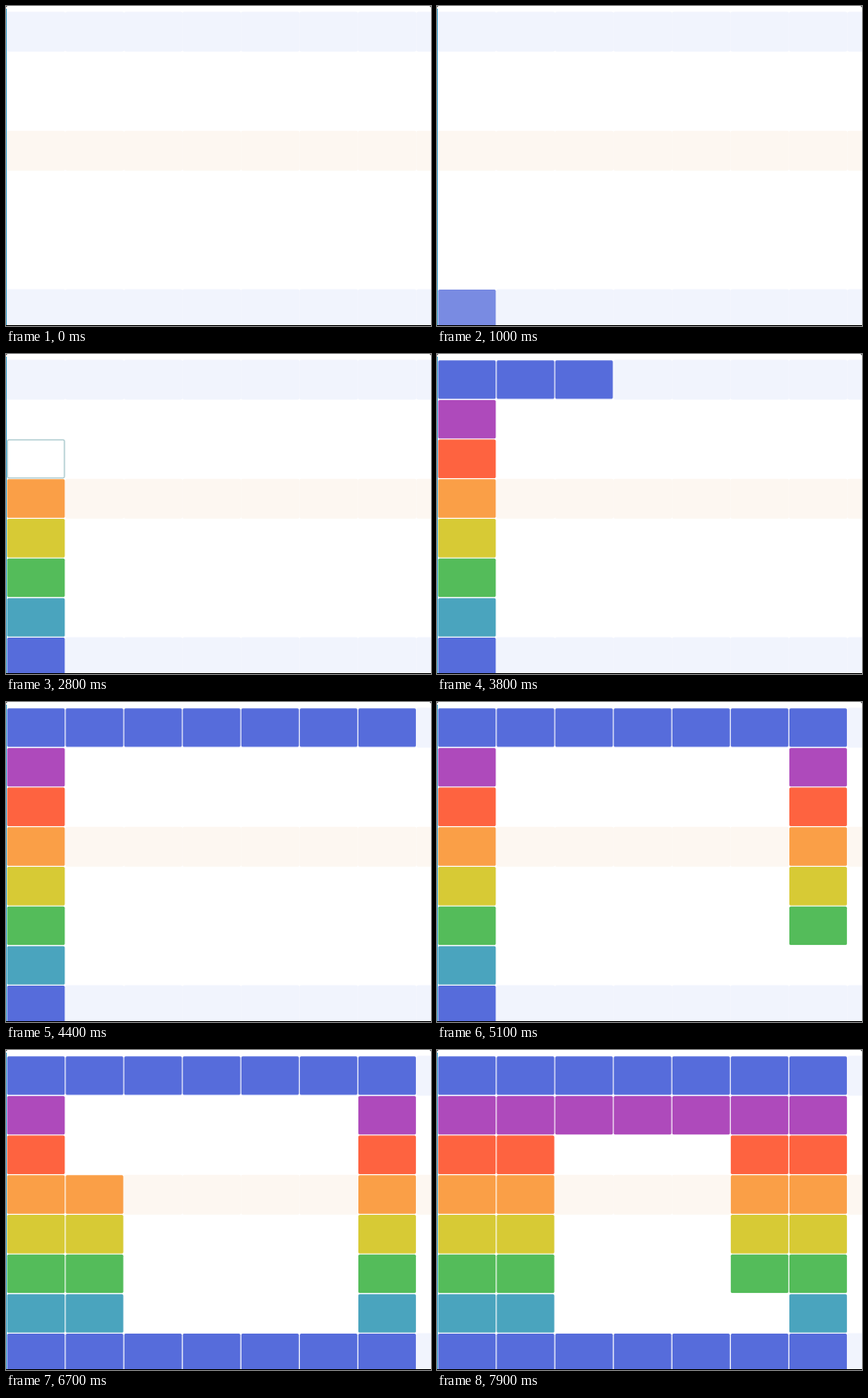
Recreate the animation shown at these times as an HTML page with a canvas. Size 480 px wide and 361 px high, loop 8 s.

```html
<!DOCTYPE html>
<html lang="en">
<head>
<meta charset="utf-8">
<title>Spiral fill</title>
<style>
  html, body { margin: 0; width: 100%; height: 100%; overflow: hidden; background: #000; }
  canvas { display: block; }
</style>
</head>
<body>
<canvas id="stage" width="480" height="361"></canvas>
<script>
const ctx = document.getElementById('stage').getContext('2d');
const LOOP = 8000, COLS = 7, ROWS = 8;
const BLUE = '#566cdb';
const COLORS = [BLUE, '#ae4abb', '#fe6340', '#fa9f47', '#d7ca35', '#54bc5a', '#4aa4be', BLUE];
const BANDS = { 0: '#f1f4fd', 3: '#fdf7f1', 7: '#f1f4fd' };
const SLOW_CELLS = 6;

// [cell index, start time in ms]; the pace picks up along the way
const PACE = [[0, 500], [1, 1200], [5, 2800], [6, 3100], [7, 3350], [9, 3700],
              [13, 4350], [23, 5750], [30, 6710], [39, 7880], [40, 8010]];

function startOf(i) {
  const k = PACE.findIndex(p => p[0] >= i);
  if (k < 0) return Infinity;
  if (k === 0) return PACE[0][1];
  const [i0, t0] = PACE[k - 1], [i1, t1] = PACE[k];
  return t0 + (t1 - t0) * (i - i0) / (i1 - i0);
}

// Clockwise inward spiral from the bottom left corner
function spiral() {
  const dirs = [[0, -1], [1, 0], [0, 1], [-1, 0]];
  const seen = new Set(), path = [];
  const free = (c, r) => c >= 0 && r >= 0 && c < COLS && r < ROWS && !seen.has(c + r * COLS);
  let c = 0, r = ROWS - 1, d = 0;
  while (path.length < COLS * ROWS) {
    path.push({ c, r, start: startOf(path.length) });
    seen.add(c + r * COLS);
    if (!free(c + dirs[d][0], r + dirs[d][1])) d = (d + 1) % 4;
    c += dirs[d][0];
    r += dirs[d][1];
  }
  return path;
}

const cells = spiral();
const cellX = c => 1.4 + 66.1 * c;
const cellY = r => 7.2 + 44.7 * r;

function box(x, y, w, h, radius) {
  ctx.beginPath();
  ctx.roundRect(x, y, w, h, radius);
}

function drawBoard() {
  ctx.fillStyle = '#000';
  ctx.fillRect(0, 0, 480, 361);
  ctx.fillStyle = '#fff';
  box(0, 0, 480, 360, 2);
  ctx.fill();
  for (const r in BANDS) {
    ctx.fillStyle = BANDS[r];
    for (let c = 0; c <= COLS; c++) {
      box(cellX(c) - 0.6, cellY(r) - 0.6, 66.3, 45, 2);
      ctx.fill();
    }
  }
}

function drawCell({ c, r }, state) {
  const x = cellX(c), y = cellY(r);
  if (state === 'outline') {
    ctx.fillStyle = '#fff';
    ctx.strokeStyle = '#a9c9cd';
    ctx.lineWidth = 1.3;
    box(x + 0.2, y + 0.2, 64.4, 43, 1.5);
    ctx.fill();
    ctx.stroke();
    return;
  }
  ctx.fillStyle = '#fff';
  box(x - 0.6, y - 0.6, 66.3, 44.7, 1);
  ctx.fill();
  ctx.globalAlpha = state === 'light' ? 0.79 : 1;
  ctx.fillStyle = COLORS[r];
  box(x, y, 64.9, 43.4, 1.5);
  ctx.fill();
  ctx.globalAlpha = 0.15;
  ctx.strokeStyle = COLORS[r];
  ctx.lineWidth = 1;
  ctx.stroke();
  ctx.globalAlpha = 1;
}

function stateOf(i, t) {
  if (i >= SLOW_CELLS) return 'full';
  const end = cells[i + 1].start;
  if (t >= end) return 'full';
  return t >= end - (i ? 100 : 200) ? 'light' : 'outline';
}

function render(t) {
  drawBoard();
  cells.forEach((cell, i) => {
    if (t >= cell.start) drawCell(cell, stateOf(i, t));
  });
  ctx.fillStyle = '#4fabd0';
  ctx.fillRect(0, 3, 1, 357);
  ctx.fillStyle = '#000';
  ctx.fillRect(0, 360, 480, 1);
}

const begin = performance.now();
function tick() {
  render((performance.now() - begin) % LOOP);
  requestAnimationFrame(tick);
}
tick();
</script>
</body>
</html>
```
